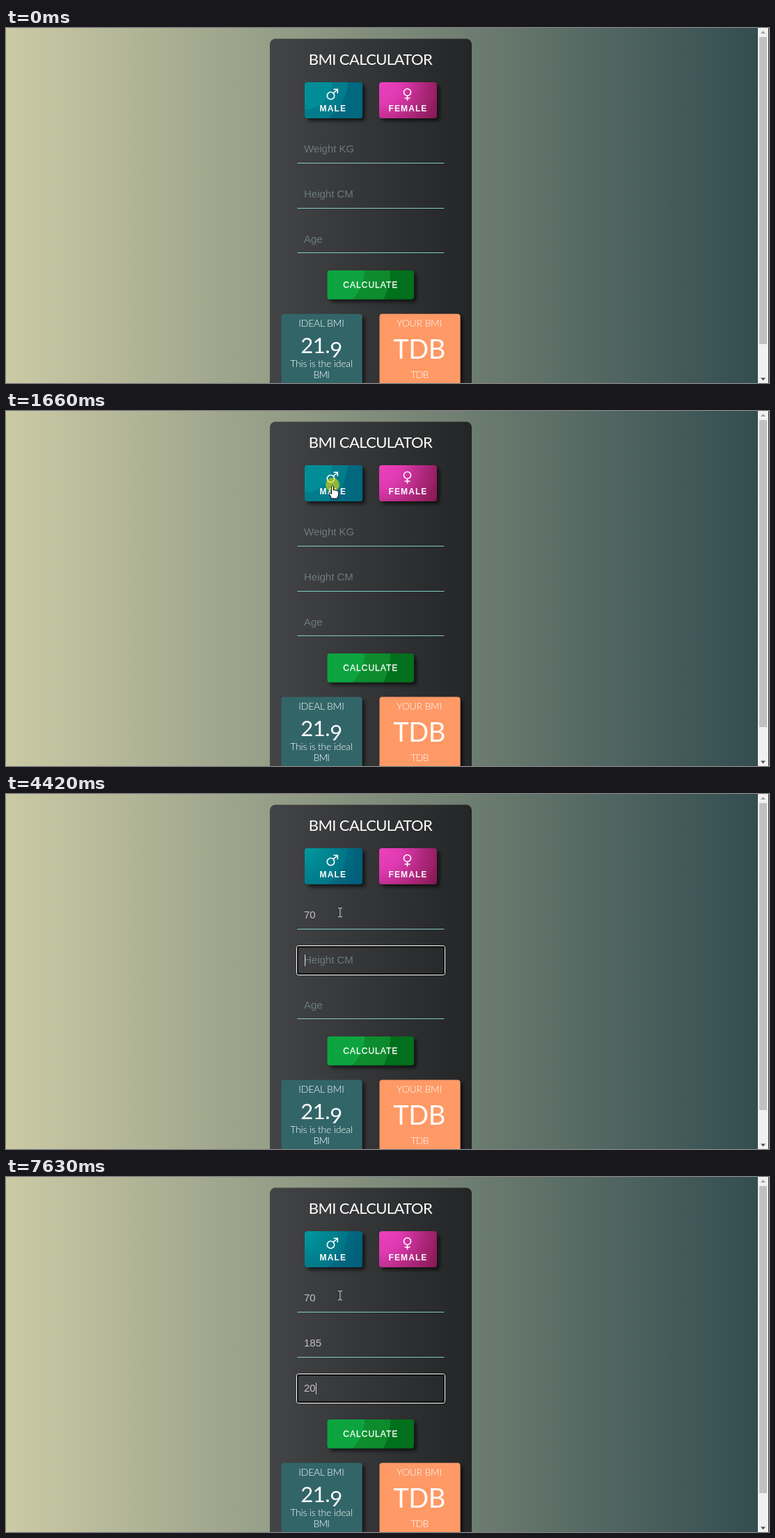
Animation of 1096 by 511 pixels, one loop 8 s. Source, as an HTML page:

```html
<!DOCTYPE html>
<html lang="en">
<head>
<meta charset="utf-8">
<title>BMI Calculator</title>
<style>
  html, body { margin: 0; width: 100%; height: 100%; overflow: hidden; }
  svg { display: block; width: 1096px; height: 511px; }
  text { fill: #fff; text-anchor: middle; white-space: pre; }
  .head { font: 400 22px Lato, sans-serif; letter-spacing: -.6px; }
  .btn { font: 700 12px "Liberation Sans", Arial, sans-serif; letter-spacing: 1.1px; }
  .calc { font-weight: 400; letter-spacing: 1.05px; stroke: #fff; stroke-width: .3; }
  .small { font: 300 14px Lato, sans-serif; letter-spacing: -.2px; }
  .short { letter-spacing: -.8px; }
  .num { font: 400 31px Lato, sans-serif; letter-spacing: -.4px; }
  .big { font: 400 38px Lato, sans-serif; letter-spacing: -.5px; }
  .field { font: 400 15px "Liberation Sans", Arial, sans-serif; text-anchor: start; }
  .icon { fill: none; stroke: #fff; stroke-width: 1.6; }
  .pointer { fill: #fff; stroke: #000; stroke-width: 1; stroke-linejoin: round; }
</style>
</head>
<body>
<svg viewBox="0 0 1096 511">
  <defs>
    <linearGradient id="page"><stop stop-color="#cbcaa5"/><stop offset="1" stop-color="#334d50"/></linearGradient>
    <linearGradient id="panel"><stop stop-color="#434446"/><stop offset="1" stop-color="#232526"/></linearGradient>
    <radialGradient id="maleIdle" gradientUnits="userSpaceOnUse" cx="429" cy="78" r="98">
      <stop offset=".4" stop-color="#048d97"/><stop offset=".4" stop-color="#037e8d"/>
      <stop offset=".63" stop-color="#037a8a"/><stop offset=".63" stop-color="#01687f"/>
    </radialGradient>
    <radialGradient id="maleOn" gradientUnits="userSpaceOnUse" cx="429" cy="78" r="98">
      <stop stop-color="#009a9e"/><stop offset=".63" stop-color="#017486"/>
      <stop offset=".63" stop-color="#016a80"/><stop offset="1" stop-color="#005a77"/>
    </radialGradient>
    <radialGradient id="female" gradientUnits="userSpaceOnUse" cx="538" cy="80" r="96">
      <stop stop-color="#ea40bb"/><stop offset=".3" stop-color="#e03ab2"/>
      <stop offset=".63" stop-color="#b0297f"/><stop offset="1" stop-color="#82174f"/>
    </radialGradient>
    <radialGradient id="green" gradientUnits="userSpaceOnUse" cx="458" cy="349" r="94">
      <stop offset=".606" stop-color="#0aa441"/><stop offset=".606" stop-color="#098d2f"/>
      <stop offset="1" stop-color="#088a2c"/><stop offset="1" stop-color="#04701a"/>
    </radialGradient>
    <filter id="shade" x="-20%" y="-20%" width="150%" height="160%">
      <feDropShadow dx="4" dy="4" stdDeviation="2.6" flood-color="#000" flood-opacity=".6"/>
    </filter>
  </defs>

  <rect width="1080" height="511" fill="url(#page)"/>
  <rect x="1080" width="15" height="511" fill="#f1f1f1"/>
  <rect x="1082" y="13" width="11" height="442" fill="#c1c1c1"/>
  <path d="M1084 8l3.5-4 3.5 4z" fill="#a3a3a3"/>
  <path d="M1084 503.500l3.500 4 3.500-4z" fill="#505050"/>
  <rect x="1095" width="1" height="511" fill="#2b2b2b"/>

  <rect x="379" y="15.500" width="290" height="520" rx="8" fill="url(#panel)"/>
  <text class="head" x="523.500" y="53">BMI CALCULATOR</text>

  <g filter="url(#shade)">
    <rect id="male" x="429" y="78" width="83" height="52" rx="4"/>
    <rect x="536" y="78" width="83" height="52" rx="4" fill="url(#female)"/>
    <rect x="461.500" y="349" width="124.500" height="41.500" rx="4" fill="url(#green)"/>
    <rect x="395.500" y="411.500" width="116" height="130" rx="4" fill="#336567"/>
    <rect x="536.500" y="411.500" width="116" height="130" rx="4" fill="#ff9966"/>
  </g>
  <g class="icon">
    <circle cx="466.500" cy="97.500" r="5.200"/>
    <path d="M470.300 93.700L476 88.500M470.500 88.300H476.300V94"/>
    <circle cx="576.500" cy="92.500" r="5"/>
    <path d="M576.500 97.500V104.500M572.500 101H580.500"/>
  </g>
  <text class="btn" x="469.800" y="120">MALE</text>
  <text class="btn" x="577.500" y="120">FEMALE</text>
  <text class="btn calc" x="523.800" y="374.300">CALCULATE</text>

  <text class="small" x="453" y="430">IDEAL BMI</text>
  <text class="num" x="453" y="468">21.<tspan dy="6">9</tspan></text>
  <text class="small" x="453" y="487.500">This is the ideal</text>
  <text class="small short" x="452.800" y="503.500">BMI</text>
  <text class="small" x="593.500" y="430">YOUR BMI</text>
  <text class="big" x="593.500" y="476">TDB</text>
  <text class="small short" x="594" y="503.500">TDB</text>

  <g id="form"></g>
  <g id="focus" fill="none">
    <rect id="ringOut" x="417.500" width="213" rx="3" stroke="#fff"/>
    <rect id="ringIn" x="419" width="210" rx="2" stroke="#0d0d0d" stroke-width="2"/>
    <rect id="caret" width="1" height="17" fill="#d0d0d0"/>
  </g>
  <circle id="press" r="10" fill="#e6dc0a" fill-opacity=".62"/>
  <g id="mouse">
    <path id="arrow" class="pointer" d="M0 0V16l3.700-3.500 2.400 5.700 2.300-1-2.400-5.500H11Z"/>
    <path id="hand" class="pointer" d="M-1.500 1.500Q0-.5 1.500 1.500V7q1.500-1.200 2.500.3 1.500-.8 2.500.6 2-.5 2.200 1.200V13q-.3 3-1.700 4.500V19H-2V17.500L-4.700 12.500q-.6-2 1-2L-1.500 12.500Z"/>
    <path id="beam" fill="none" stroke="#d5d5d5" d="M-3-6H-1L0-5 1-6H3M0-5V6M-3 7H-1L0 6 1 7H3"/>
  </g>
</svg>
<script>
const LOOP = 8000, STEP = 70;
const $ = id => document.getElementById(id);
const set = (el, attrs) => { for (const k in attrs) el.setAttribute(k, attrs[k]); };
const show = (el, on) => set(el, { display: on ? "inline" : "none" });
const add = (tag, attrs) => {
  const el = document.createElementNS("http://www.w3.org/2000/svg", tag);
  set(el, attrs);
  return $("form").appendChild(el);
};

const hints = ["Weight KG", "Height CM", "Age"];
const fields = hints.map((hint, i) => {
  const dy = 64.6 * i;
  add("rect", { x: 418.5, y: Math.round(194 + dy), width: 211, height: 1, fill: "#80cbc4" });
  return add("text", { class: "field", x: 428, y: 179.3 + dy });
});

// time, focused field, its text, caret visible
const typing = [
  [2200, 0, "", 1], [2730, 0, "", 0], [3290, 0, "7", 1], [3490, 0, "70", 1], [4020, 0, "70", 0],
  [4420, 1, "", 1], [4900, 1, "1", 1], [5360, 1, "18", 1], [5630, 1, "185", 1], [6160, 1, "185", 0],
  [6430, 2, "", 1], [6700, 2, "23", 1], [6900, 2, "230", 1], [7300, 2, "23", 1],
  [7430, 2, "2", 1], [7630, 2, "20", 1]
];

// time, x, y of the pointer's hot spot
const path = [
  [70, 782, 359], [350, 565, 214], [560, 422, 126], [700, 442, 106], [770, 455, 102],
  [840, 462, 101], [1050, 469, 107], [1730, 469, 107], [2130, 480, 170]
];

const inside = (x, y, l, t, r, b) => x >= l && x <= r && y >= t && y <= b;

function pointerAt(t) {
  const n = path.findIndex(p => p[0] > t);
  if (n < 0) return path[path.length - 1].slice(1);
  const [t0, x0, y0] = path[n - 1], [t1, x1, y1] = path[n];
  const k = (t - t0) / (t1 - t0);
  return [x0 + (x1 - x0) * k, y0 + (y1 - y0) * k];
}

function drawPointer(t) {
  const tick = Math.floor(t / STEP) * STEP;
  show($("mouse"), tick >= 70);
  const pressed = (t >= 1660 && t < 1800) || (t >= 2200 && t < 2330);
  show($("press"), pressed);
  if (tick < 70) return;
  const [x, y] = pointerAt(tick);
  const overField = [0, 1, 2].some(i => inside(x, y, 419, 155 + 65 * i, 629, 195 + 65 * i));
  const overButton = inside(x, y, 429, 78, 512, 130) || inside(x, y, 536, 78, 619, 130) ||
    inside(x, y, 462, 349, 586, 390);
  show($("beam"), overField);
  show($("hand"), overButton);
  show($("arrow"), !overField && !overButton);
  set($("mouse"), { transform: `translate(${Math.round(x)} ${Math.round(y)})` });
  set($("press"), { cx: x - (overField ? 2 : 0), cy: y - 1 });
}

function drawForm(t) {
  const values = ["", "", ""];
  let now = null;
  for (const e of typing) {
    if (e[0] > t) break;
    values[e[1]] = e[2];
    now = e;
  }
  fields.forEach((el, i) => {
    el.textContent = values[i] || hints[i];
    el.style.fill = values[i] ? "#c2c2c2" : "#6c7c77";
  });
  show($("focus"), now);
  if (!now) return;
  const [, i, text, caret] = now;
  const top = 153 + 65 * i, h = i ? 42 : 43;
  set($("ringOut"), { y: top + .5, height: h });
  set($("ringIn"), { y: top + 2, height: h - 3 });
  set($("caret"), { x: 429 + 8 * text.length, y: Math.round(166.5 + 64.5 * i) });
  show($("caret"), caret);
}

function draw(t) {
  set($("male"), { fill: t < 1800 ? "url(#maleIdle)" : "url(#maleOn)" });
  drawForm(t);
  drawPointer(t);
}

const start = performance.now();
function frame() {
  draw((performance.now() - start) % LOOP);
  requestAnimationFrame(frame);
}
draw(0);
requestAnimationFrame(frame);
</script>
</body>
</html>
```
